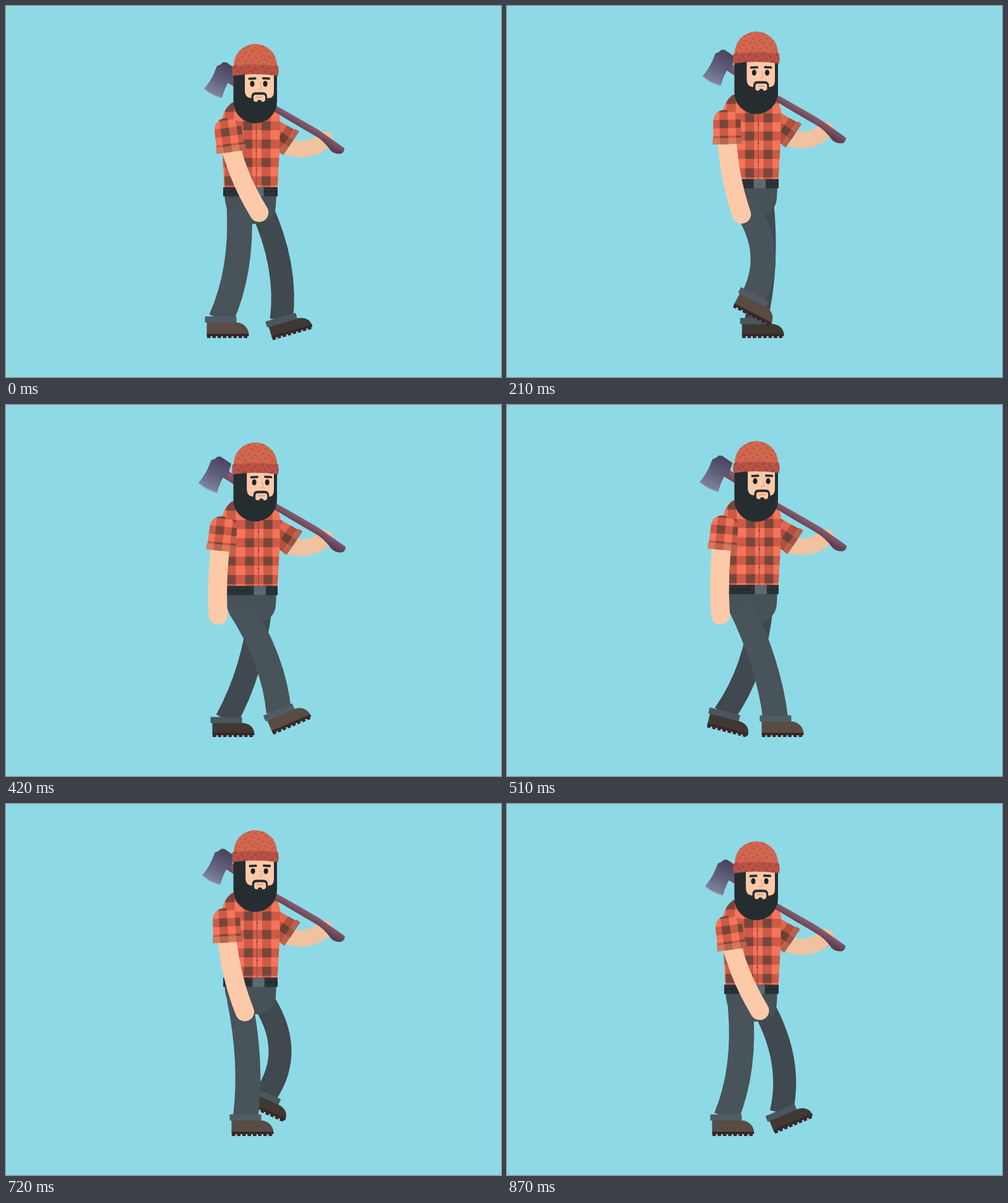
An HTML page with a canvas that plays this animation: 800 by 600 pixels, repeating every 900 ms.

```html
<!DOCTYPE html>
<html lang="en">
<head>
<meta charset="utf-8">
<title>Walking lumberjack</title>
<style>
html, body { margin: 0; width: 100%; height: 100%; overflow: hidden; background: #8ddae6; }
canvas { display: block; width: 800px; height: 600px; }
</style>
</head>
<body>
<canvas id="stage" width="800" height="600"></canvas>
<script>
const ctx = document.getElementById('stage').getContext('2d');
const LOOP = 900, STEP = 30, RAD = Math.PI / 180;

// Ankle over one stride: [ms, x, y, degrees]
const STRIDE = [
  [0, 347, 507, 0], [40, 347, 502, 10], [120, 368, 481, 25], [150, 379, 475, 29],
  [270, 417, 469, 24], [300, 426, 472, 14], [420, 441, 497, -23], [450, 443, 505.5, -16],
  [480, 440, 507, -4], [510, 434, 507, 0], [600, 413.5, 507, 0], [720, 387, 507, 0],
  [870, 354, 507, 0]
];

const PLAID = { base: '#f4755c', mid: '#cd5a45', dark: '#77463a' };
const PLAID_FAR = { base: '#e0674f', mid: '#b34f3e', dark: '#6b4035' };

const mod = (a, n) => ((a % n) + n) % n;

function key(i) {
  const n = STRIDE.length, k = STRIDE[mod(i, n)];
  return [k[0] + Math.floor(i / n) * LOOP, k[1], k[2], k[3]];
}

// Monotone cubic through the stride keys
function ankle(ms) {
  const t = mod(ms, LOOP);
  let i = STRIDE.length - 1;
  while (STRIDE[i][0] > t) i--;
  const [a, b, c, d] = [key(i - 1), key(i), key(i + 1), key(i + 2)];
  const h = c[0] - b[0], u = (t - b[0]) / h;
  const slope = (p, q, j) => (q[j] - p[j]) / (q[0] - p[0]);
  const tangent = (m, n) => m * n <= 0 ? 0 : 2 * m * n / (m + n);
  return [1, 2, 3].map(j => {
    const s = slope(b, c, j);
    const m0 = tangent(slope(a, b, j), s) * h, m1 = tangent(s, slope(c, d, j)) * h;
    return (1 + 2 * u) * (1 - u) ** 2 * b[j] + u * (1 - u) ** 2 * m0 +
      u * u * (3 - 2 * u) * c[j] + u * u * (u - 1) * m1;
  });
}

// 0 when the body is low, 1 when high; two unequal rises per loop
function rise(ms) {
  const t = mod(ms, LOOP), ease = u => (1 - Math.cos(Math.PI * u)) / 2;
  if (t < 210) return ease(t / 210);
  if (t < 450) return 1 - ease((t - 210) / 240);
  if (t < 690) return ease((t - 450) / 240);
  return 1 - ease((t - 690) / 210);
}

function at(x, y, deg, draw) {
  ctx.save();
  ctx.translate(x, y);
  ctx.rotate(deg * RAD);
  draw();
  ctx.restore();
}

function fill(color, d) {
  ctx.fillStyle = color;
  ctx.fill(new Path2D(d));
}

function line(color, width, d, cap = 'butt') {
  ctx.strokeStyle = color;
  ctx.lineWidth = width;
  ctx.lineCap = cap;
  ctx.stroke(new Path2D(d));
}

function rect(color, x, y, w, h, r = 0) {
  ctx.fillStyle = color;
  ctx.beginPath();
  ctx.roundRect(x, y, w, h, r);
  ctx.fill();
}

function ellipse(color, x, y, rx, ry) {
  ctx.fillStyle = color;
  ctx.beginPath();
  ctx.ellipse(x, y, rx, ry, 0, 0, 7);
  ctx.fill();
}

function clipped(d, draw) {
  ctx.save();
  ctx.clip(new Path2D(d));
  draw();
  ctx.restore();
}

function gradient(x0, y0, x1, y1, ...colors) {
  const g = ctx.createLinearGradient(x0, y0, x1, y1);
  colors.forEach((c, i) => g.addColorStop(i / (colors.length - 1), c));
  return g;
}

// Plaid cloth filling a path; (x, y) is the corner of one dark square
function plaid(d, c, x, y, pitch, w) {
  clipped(d, () => {
    rect(c.base, -900, -900, 1800, 1800);
    const n = 8;
    for (let i = -n; i <= n; i++) {
      rect(c.mid, x + i * pitch, y - 300, w, 600);
      rect(c.mid, x - 300, y + i * pitch, 600, w);
    }
    for (let i = -n; i <= n; i++)
      for (let j = -n; j <= n; j++) rect(c.dark, x + i * pitch, y + j * pitch, w, w);
  });
}

function leg(hx, hy, [x, y, deg], far) {
  const dx = x - hx, dy = y - hy, dist = Math.hypot(dx, dy);
  const bend = far ? Math.max(17, 20 + 1.04 * (192 - dist))
                   : 16 + 30 * Math.max(0, (191 - dist) / 29) ** 1.2;
  const kx = hx + .55 * dx + bend * dy / dist, ky = hy + .55 * dy - bend * dx / dist;
  line(far ? '#3f494f' : '#48535a', far ? 37 : 40.5, `M${hx} ${hy}Q${kx} ${ky} ${x} ${y}`);
  at(x, y, deg, () => {
    ctx.save();
    if (far) ctx.translate(0, -2.5);
    ctx.setLineDash([5.5, 3]);
    line('#3a2629', 5, 'M-22 27.4H45');
    ctx.setLineDash([]);
    fill(far ? '#3f3833' : '#584c45', `M-22.500 ${far ? 7 : 4.5}H23C36 ${far ? 7 : 4.5} 45 13 45.500 25H-22.500Z`);
    rect('#3a2629', -22.5, 23, 68, 4, 1.5);
    ctx.restore();
    rect(far ? '#4a565d' : '#4f5c64', -25.5, -5, 51, 10, 1);
  });
}

function torso(s) {
  plaid('M366 156Q350 168 348.500 188L350 240 353 294H438.500L442 235 443 182 436 158Z',
    PLAID, 383.5 + 3 * s, 186.4, 29.7, 14.5);
  const x = 404.5 + 3.5 * s;
  line('#8a4136', 1, `M${x} 185V293`);
  for (let y = 205; y < 290; y += 30) ellipse('#6b3b32', x, y, 1.2, 1.2);
  rect('#2a3237', 351, 293, 88, 15);
  ctx.setLineDash([6, 3]);
  line('#1c2327', 1.2, 'M352 300.500H438');
  ctx.setLineDash([]);
  rect('#5d6971', 397 + 3.5 * s, 293, 19.5, 15, 1);
}

function farSleeve(s) {
  at(461 + 5.5 * s, 222 + 2 * s, 34, () => {
    plaid('M-50 -18L-5 -21V22H-50Z', PLAID_FAR, -22, -6, 27, 13);
    rect('#b5644d', -8, -23, 8, 46, 1);
    rect('#9c5443', -8, -6, 8, 13);
  });
}

function nearArm(s, y) {
  const hx = 409 - 67 * s;
  line('#fccaa8', 30.5, `M${358 - 8 * s} ${205 + y}Q${370 - 31 * s} 270 ${hx} ${334 + 6 * s}`, 'round');
  at(359 - 8 * s, 200 + y, -8 + 14 * s, () => {
    plaid('M-22 2Q-22 -18 -3 -19Q21 -18 22 2L23 34H-23Z', PLAID, -12, -3, 26, 13.5);
    rect('#d87a5c', -24, 26.5, 48, 10, 1);
    rect('#b9644c', -12, 26.5, 13.5, 10);
    rect('#b9644c', 14, 26.5, 10, 10);
  });
}

function axe(s) {
  at(545 + 2 * s, 233, 32, () => {
    ctx.scale(1 + .055 * s, 1);
    ctx.rotate(-32 * RAD);
    ctx.translate(-545, -233);
    fill(gradient(430, 172, 436, 162, '#5c3f51', '#85586a'),
      'M358 107L437 161.500Q486 189 506 201Q522 212 547 230Q547 237 541 239Q531 240 525 234Q513 217 498 209Q470 193 437 173L352 120Z');
    fill(gradient(358, 96, 334, 145, '#4b4660', '#62617c', '#8387a2'),
      'M351 91L356 91 372 102 366 121 359 124Q353 134 349 149Q332 145 320 134Q331 121 336.500 108L341 97 346 95Z');
    line('#a3a5bd', 1.4, 'M320.500 134Q332 144.500 348.500 148.500');
  });
}

// Short knitted dashes in a staggered herringbone
function knit(color, x0, y0, cols, rows) {
  for (let j = 0; j < rows; j++)
    for (let i = 0; i < cols; i++)
      at(x0 + i * 11 + (j % 2) * 5, y0 + j * 7.5 + (i % 2) * 3, (i + j) % 2 ? 38 : -38,
        () => line(color, 1.8, 'M-3 0H3'));
}

function face(s, eyeScale) {
  const x = 3.2 * s;
  fill('#fccaa8', `M${386 + x} 98H433V138Q433 149 425 149H${396 + x}Q${386 + x} 148 ${386 + x} 137Z`);
  ctx.save();
  ctx.translate(x, 0);
  at(398, 117.2, -3, () => rect('#262d31', -6.5, -1.8, 13, 3.8, 1.5));
  at(420.5, 117, 3, () => rect('#262d31', -6.5, -1.8, 13, 3.8, 1.5));
  ellipse('#1c2226', 398, 125.8, 3.6, 4.8 * eyeScale);
  ellipse('#1c2226', 419, 125.8, 3.6, 4.8 * eyeScale);
  line('#e3a585', 1.2, 'M410 123L413 132Q412 135 407 134.500');
  fill('#262d31', 'M396.500 152V146Q397 139.500 403 139.500H415Q421.500 139.500 422 146V152Z');
  fill('#fccaa8', 'M400 152V147.500Q400 143.500 404 143.500H415Q419 143.500 419 147.500V151Q419 155 414 155H405Q400 155 400 152Z');
  line('#d2876c', 1.2, 'M403.500 147.500H415');
  fill('#262d31', 'M406 156V153.500Q409.500 150 413 153.500V156Z');
  ctx.restore();
}

function head(t, s, up) {
  const hat = -20 * up, chin = 190 - 15.5 * rise(t - 20);
  const blink = 1 - .68 * Math.max(0, 1 - Math.abs(t - 120) / 70);
  fill('#262d31', `M367.500 ${104 + hat}V${chin - 35}A35.250 35 0 0 0 438 ${chin - 35}V${104 + hat}Z`);
  at(0, -18 * up, 0, () => face(s, blink));
  at(0, hat, 0, () => {
    const dome = 'M368 100V96A35 34.700 0 0 1 438 96V100Z';
    const brim = 'M366 97Q403 92 440 97Q441 105 440 113Q403 107.500 366 113Q364.500 105 366 97Z';
    fill('#d2674f', dome);
    clipped(dome, () => knit('#b95342', 371, 65, 7, 5));
    fill('#b85246', brim);
    clipped(brim, () => knit('#9d4039', 370, 98.5, 7, 2));
  });
}

function draw(t) {
  const up = rise(t), s = (1 - Math.cos(2 * Math.PI * t / LOOP)) / 2, y = -13 * up;
  rect('#8ddae6', 0, 0, 800, 600);

  const [fx, fy, fr] = ankle(t + LOOP / 2);
  leg(412, 325 + y, [fx + 2, fy + 2.5, fr], true);
  at(0, y, 0, () =>
    fill('#465158', 'M353 304H437L436 324Q434 351 402 352.500H378Q355 343 353 304Z'));
  leg(377, 326 + y, ankle(t), false);

  at(0, -15 * up, 0, () =>
    line('#f0c29f', 26.5, 'M440 221Q484 244.500 515 216', 'round'));
  at(0, y, 0, () => { farSleeve(s); torso(s); });
  at(0, -17 * up, 0, () => axe(s));
  nearArm(s, y);
  head(t, s, up);
}

function tick() {
  draw(Math.floor(performance.now() % LOOP / STEP) * STEP);
  requestAnimationFrame(tick);
}
tick();
</script>
</body>
</html>
```
